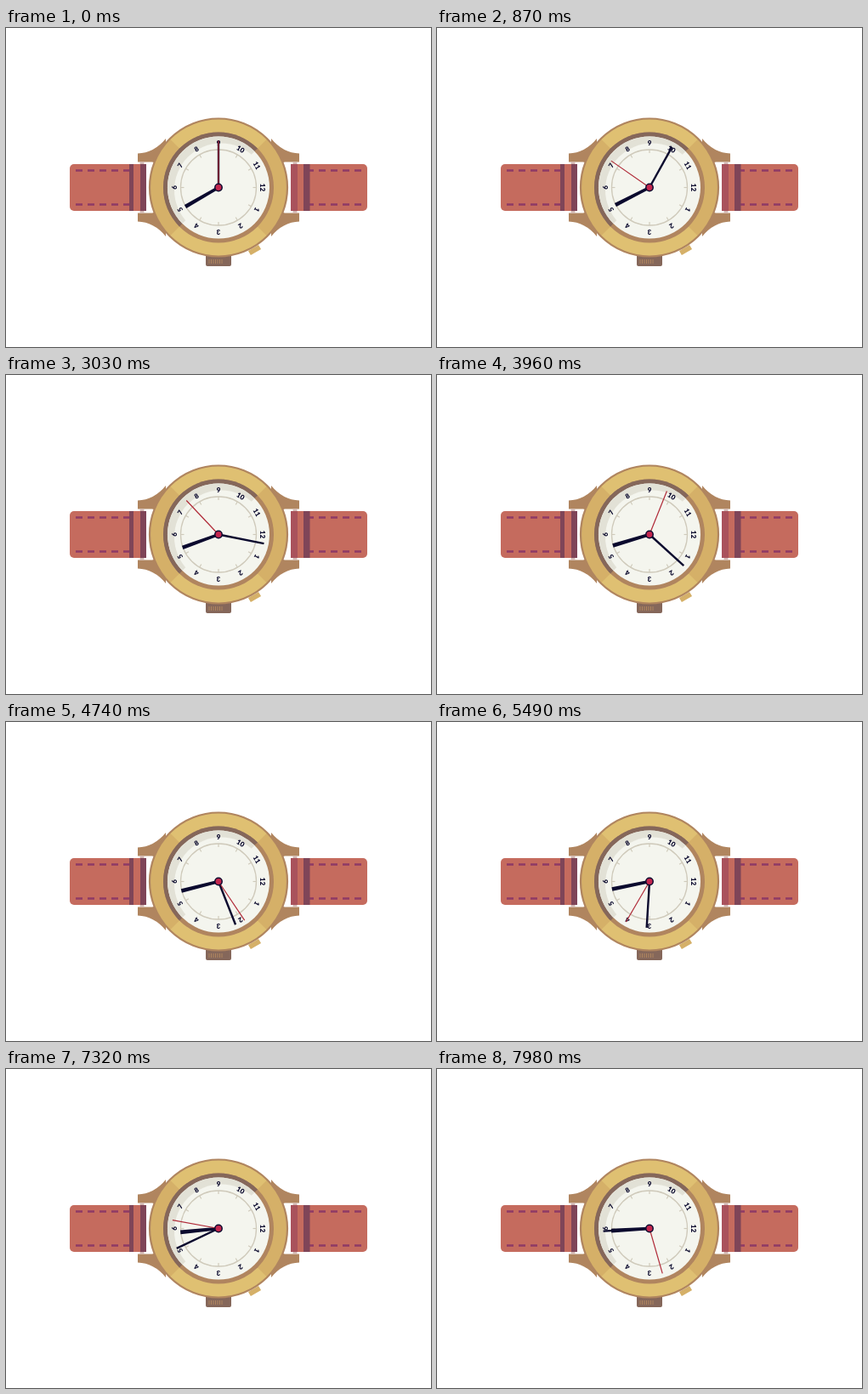
These frames come from a looping animation (500 by 375 pixels, 8 s). An HTML page:

```html
<!DOCTYPE html>
<html lang="en">
<head>
<meta charset="utf-8">
<title>Watch</title>
<style>
  html, body { margin: 0; width: 100%; height: 100%; overflow: hidden; background: #fff; }
  svg { display: block; width: 500px; height: 375px; }
  #numerals { font: 900 8px Lato, sans-serif; fill: #0b0a2e; text-anchor: middle; }
</style>
</head>
<body>
<svg viewBox="0 0 500 375">
  <defs>
    <clipPath id="upperLeft"><path d="M-70 70V-70H70Z"/></clipPath>
    <g id="lug">
      <path d="M155 147.5Q174 147 188 130V162L172 157.5H155Z" fill="#b0855f"/>
      <path d="M157.5 157.5h5v3h-5z" fill="#d3b8b4"/>
    </g>
    <g id="lugPair">
      <use href="#lug"/>
      <use href="#lug" transform="matrix(1 0 0 -1 0 375)"/>
    </g>
    <path id="stitches" d="M82 167.5h64M82 207.5h64" stroke="#8f3a66" stroke-width="2.5" stroke-dasharray="8 6"/>
    <path id="strap" d="M165 160H80a5 5 0 0 0-5 5v45a5 5 0 0 0 5 5h85z" fill="#c56b5e"/>
  </defs>

  <use href="#lugPair"/>
  <use href="#lugPair" transform="matrix(-1 0 0 1 500 0)"/>

  <use href="#strap"/>
  <use href="#strap" transform="matrix(-1 0 0 1 500 0)"/>
  <use href="#stitches"/>
  <use href="#stitches" transform="matrix(-1 0 0 1 500 0)"/>
  <path d="M145 160h5v55h-5zM158 160h7v55h-7zM350 160h7.500v55h-7.500z" fill="#7f4558"/>
  <path d="M335 160h8v55h-8z" fill="#a9525c"/>

  <!-- crown and push button -->
  <rect x="235" y="264" width="30" height="16" rx="2" fill="#85675a"/>
  <path d="M238.500 274.500h17" stroke="#b0855f" stroke-width="5" stroke-dasharray="1 1.500"/>
  <rect x="-7" y="-3" width="14" height="6" fill="#d5b068" transform="translate(292.500 261) rotate(-30)"/>

  <g transform="translate(250 187.500)">
    <circle r="81" fill="#dfc072"/>
    <path d="M0 0L-57.300-57.300A81 81 0 0 0-57.300 57.300ZM0 0L57.300-57.300A81 81 0 0 1 57.300 57.300Z" fill="#d5b068"/>
    <circle r="81" fill="none" stroke="#b0855f" stroke-width="2.200"/>
    <circle r="65" fill="#b0855f"/>
    <circle r="65" fill="#85675a" clip-path="url(#upperLeft)"/>
    <circle r="60" fill="#f4f5ee"/>
    <circle r="60" fill="#e2e1d6" clip-path="url(#upperLeft)"/>
    <circle cx="3" cy="3" r="55" fill="#f4f5ee"/>
    <circle r="44.500" fill="none" stroke="#cfcabb" stroke-width="1.300"/>
    <g id="ticks" stroke="#cfcabb" stroke-width="1.200"></g>
    <g id="numerals"></g>

    <path id="hour" d="M-1.700 0L-2.300-45H2.300L1.700 0Z" fill="#0b0a2e"/>
    <path id="minute" d="M0 0V-54.500" stroke="#0b0a2e" stroke-width="2.400"/>
    <path id="second" d="M0 0V-55" stroke="#b02a38" stroke-width="1.200"/>
    <circle r="4.200" fill="#c4264e" stroke="#0b0a2e" stroke-width="1.500"/>
  </g>
</svg>
<script>
  const LOOP_MS = 8000;
  const STEP_MS = 30;
  const MINUTE_SPEED = 33.425; // degrees per second

  const byId = id => document.getElementById(id);
  const turn = (id, angle) => byId(id).setAttribute('transform', `rotate(${angle})`);

  // The dial is turned so that 9 stands at the top.
  const hours = Array.from({ length: 12 }, (_, i) => ({ angle: i * 30, label: (i + 8) % 12 + 1 }));
  byId('ticks').innerHTML = hours.map(({ angle }) =>
    `<path d="M0-44.500v4" transform="rotate(${angle})"/>`).join('');
  byId('numerals').innerHTML = hours.map(({ angle, label }) =>
    `<text y="-49.200" transform="rotate(${angle})">${label}</text>`).join('');

  function draw(now) {
    const time = Math.floor(now % LOOP_MS / STEP_MS) * STEP_MS;
    const angle = MINUTE_SPEED * time / 1000;
    turn('hour', 240 + angle / 10);
    turn('minute', angle);
    turn('second', angle * 60);
  }

  const start = performance.now();
  function tick() {
    draw(performance.now() - start);
    requestAnimationFrame(tick);
  }
  tick();
</script>
</body>
</html>
```
